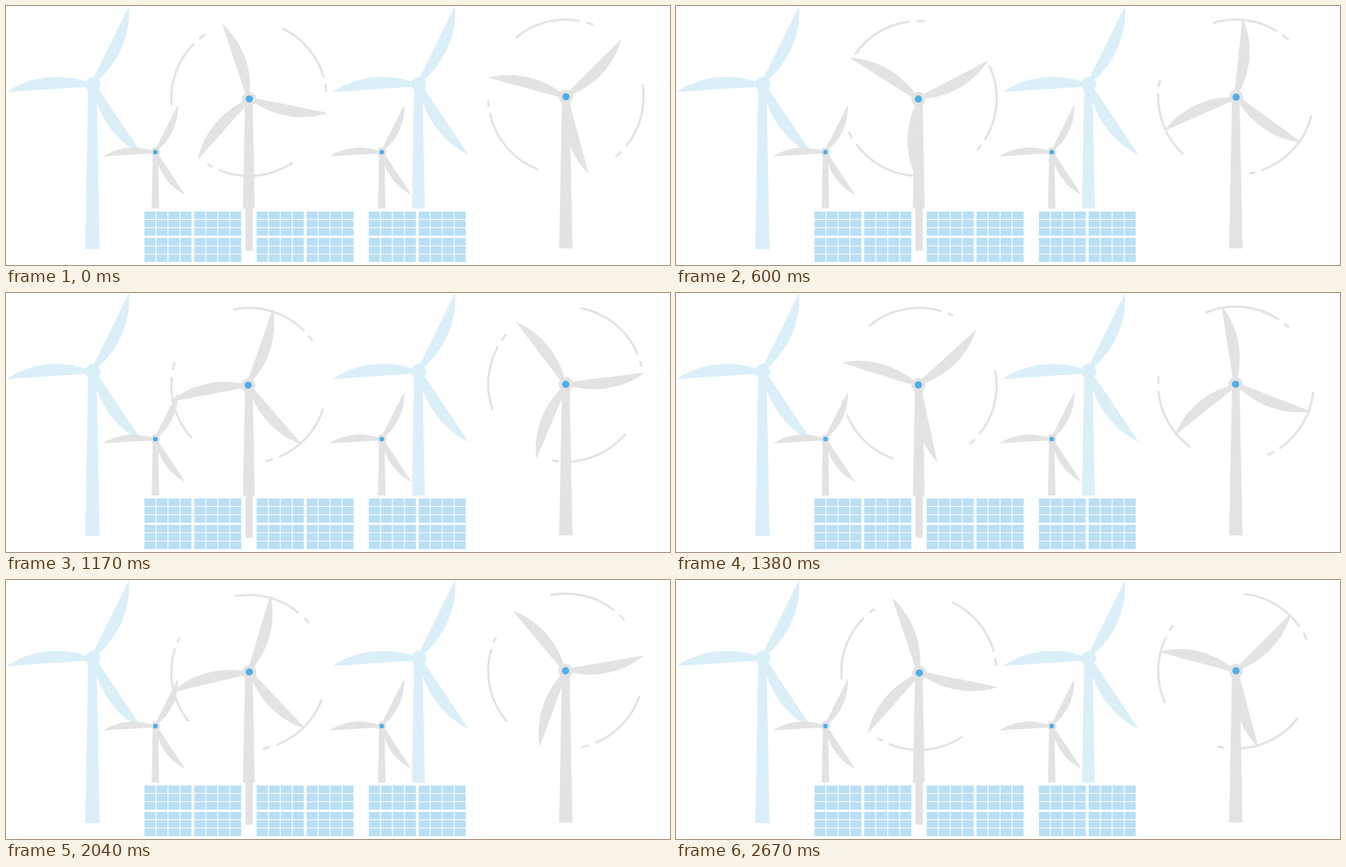
An HTML page with a canvas that plays this animation: 880x344 px, repeating every 2.7 s.

```html
<!DOCTYPE html>
<html lang="en">
<head>
<meta charset="utf-8">
<title>Wind and solar</title>
<style>
  html, body { margin: 0; width: 100%; height: 100%; overflow: hidden; background: #fff; }
  canvas { display: block; }
</style>
</head>
<body>
<canvas id="stage" width="880" height="344"></canvas>
<script>
const ctx = document.getElementById('stage').getContext('2d');
const LOOP = 2700, STEP = 30, TURN = LOOP - STEP;
const GREY = '#e3e3e3', PALE = '#dbeff9', BLUE = '#4faee8', PANEL = '#b9dff5';
const rad = deg => deg * Math.PI / 180;

// Arc spans in degrees: three sweeps, each trailed by a short dash.
const RING = [[-64.7, -15.8], [-10.7, -5], [56, 113], [117.8, 122.3], [175, 225], [230, 235.4]];

function disc(x, y, r, color) {
  ctx.fillStyle = color;
  ctx.beginPath();
  ctx.arc(x, y, r, 0, 2 * Math.PI);
  ctx.fill();
}

function tower(x, top, bottom, topHalf, bottomHalf, color) {
  ctx.fillStyle = color;
  ctx.beginPath();
  ctx.moveTo(x - topHalf, top);
  ctx.lineTo(x + topHalf, top);
  ctx.lineTo(x + bottomHalf, bottom);
  ctx.lineTo(x - bottomHalf, bottom);
  ctx.fill();
}

function rotor(x, y, length, angle, color) {
  ctx.fillStyle = color;
  for (let i = 0; i < 3; i++) {
    ctx.save();
    ctx.translate(x, y);
    ctx.rotate(rad(angle + i * 120));
    ctx.scale(length / 105, length / 105);
    ctx.beginPath();
    ctx.moveTo(4, -2.5);
    ctx.lineTo(105, -0.4);
    ctx.lineTo(105, 0.4);
    ctx.bezierCurveTo(72, 18, 34, 16, 6, 3);
    ctx.fill();
    ctx.restore();
  }
}

function ring(x, y, angle) {
  ctx.strokeStyle = GREY;
  ctx.lineWidth = 3;
  for (const [from, to] of RING) {
    ctx.beginPath();
    ctx.arc(x, y, 103, rad(from + angle), rad(to + angle));
    ctx.stroke();
  }
}

function paleTurbine(x) {
  tower(x - 0.5, 104, 323, 5.5, 9.5, PALE);
  rotor(x, 104, 113.5, 55, PALE);
  disc(x, 104, 10, PALE);
}

function smallTurbine(x) {
  tower(x, 194, 272, 3.5, 5, GREY);
  rotor(x, 194, 68.5, 55.5, GREY);
  disc(x, 194, 6.2, GREY);
  disc(x, 194, 3.1, BLUE);
}

// The hub sits slightly off the pivot, so it wobbles as the rotor turns.
function bigTurbine(x, y, base, angle, wobble, phase, spin) {
  const hubX = x + wobble * Math.cos(rad(phase + spin));
  const hubY = y + wobble * Math.sin(rad(phase + spin));
  tower(x, y, base, 5, 8.9, GREY);
  rotor(hubX, hubY, 105, angle + spin, GREY);
  disc(hubX, hubY, 9.5, GREY);
  disc(hubX, hubY, 4.8, BLUE);
}

function panel(x, y) {
  ctx.fillStyle = PANEL;
  for (let row = 0; row < 3; row++)
    for (let col = 0; col < 4; col++)
      ctx.fillRect(x + col * 15.9, y + row * 11, 14.7, 10);
}

function panelGroup(x) {
  ctx.fillStyle = '#fff';
  ctx.fillRect(x - 5, 269, 139, 75);
  for (const dx of [0, 66])
    for (const y of [273, 308]) panel(x + dx, y);
}

function draw(now) {
  const t = Math.floor(now % LOOP / STEP) * STEP;
  const spin = 360 * t / TURN;

  ctx.fillStyle = '#fff';
  ctx.fillRect(0, 0, 880, 344);

  paleTurbine(115);
  paleTurbine(547);
  ring(322, 122.8, -spin);
  ring(742, 121, 55.2 - 434.2 * t / TURN);
  bigTurbine(321.8, 122.8, 325, 10.3, 0.9, 45, spin);
  bigTurbine(741.9, 120.9, 322, 73.9, 0.4, -60, spin);
  smallTurbine(198);
  smallTurbine(498);
  [183.4, 332.3, 480.9].forEach(panelGroup);

  requestAnimationFrame(draw);
}
requestAnimationFrame(draw);
</script>
</body>
</html>
```
